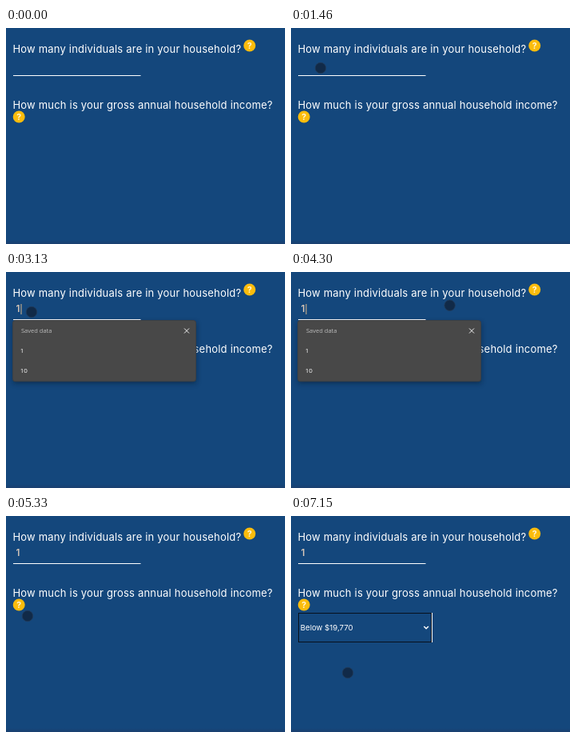
Write an HTML page that moves like this. It is 349x270 px and loops after 8000 ms.

```html
<!DOCTYPE html>
<html lang="en">
<head>
<meta charset="utf-8">
<title>Household form</title>
<style>
  html, body { margin: 0; width: 100%; height: 100%; overflow: hidden; background: #14477c; }
  svg { display: block; width: 100%; height: 100%; }
  text { font-family: Inter, sans-serif; fill: #fff; }
  .ask { font-size: 13px; letter-spacing: .2px; }
  .mark { font-size: 10.5px; font-weight: 700; text-anchor: middle; fill: #fff6d6; }
  .value { font-size: 11.5px; font-weight: 600; fill: #d6c6b8; }
  .option { font-size: 9.6px; }
  .saved text { font-family: "Open Sans", sans-serif; font-size: 8px; }
  .saved .head { font-size: 7.5px; fill: #bcbcbc; }
</style>
</head>
<body>
<svg viewBox="0 0 349 270">
  <defs>
    <filter id="soft" x="-20%" y="-20%" width="140%" height="140%"><feGaussianBlur stdDeviation="3"/></filter>
    <linearGradient id="foot" x2="0" y2="1">
      <stop offset="0" stop-color="#14477c"/>
      <stop offset="1" stop-color="#1a3f6f"/>
    </linearGradient>
    <g id="help">
      <circle r="7.5" fill="#fbbc0c"/>
      <text class="mark" y="3.8">?</text>
    </g>
  </defs>
  <rect width="349" height="270" fill="#14477c"/>
  <rect y="265" width="349" height="5" fill="url(#foot)"/>

  <text class="ask" x="8.4" y="31">How many individuals are in your household?</text>
  <use href="#help" x="304.7" y="22"/>
  <rect x="9" y="59" width="159.5" height="1" fill="#fff"/>
  <text class="value" id="typed" x="12.4" y="50">1</text>
  <rect id="caret" y="40" width="1" height="13" fill="#d9b78c"/>

  <text class="ask" x="8.4" y="101">How much is your gross annual household income?</text>
  <use href="#help" x="16.2" y="111"/>

  <g id="select">
    <rect id="underline" x="9" y="157" width="167" height="1" fill="#fff"/>
    <g id="focus">
      <rect x="176" y="121" width="1" height="37" fill="#fff"/>
      <rect x="9.5" y="121.5" width="166" height="36" fill="none" stroke="#07101c"/>
    </g>
    <text class="option" id="blank" x="11.8" y="143" letter-spacing="-.7">---------</text>
    <text class="option" id="choice" x="11.8" y="143">Below $19,770</text>
    <path d="M166.3 138 l2.8 2.8 2.8 -2.8" fill="none" stroke="#fff" stroke-width="1.5"/>
  </g>

  <g id="list">
    <rect x="9" y="164" width="167" height="93" rx="4" fill="#0a2748" opacity=".5" filter="url(#soft)"/>
    <rect x="9.5" y="161.5" width="166" height="92" rx="4" fill="#14457a" stroke="#50667f"/>
    <path d="M12 161.5H173" stroke="#9fb3c8"/>
  </g>

  <g id="saved" class="saved">
    <rect id="shade" x="9" y="63" width="229" fill="#06172c" opacity=".5" filter="url(#soft)"/>
    <rect id="panel" x="8.5" y="60.5" width="229" rx="3" fill="#484848" stroke="#3b3f44"/>
    <text class="head" x="19" y="76.3">Saved data</text>
    <path d="M223 70.5 l6 6 m0 -6 l-6 6" stroke="#f0f0f0" fill="none"/>
    <g id="rows"></g>
  </g>

  <circle id="cursor" r="6.7" fill="#112a48" stroke="#223c5a" stroke-width=".8"/>
</svg>
<script>
const LOOP = 8000, TICK = 1000 / 15, BLINK = 533, ROW = 24.4;
const APPEAR = 66, FOCUS = 1866, TYPE = 3130, LEAVE = 4430, CHOOSE = 7060;
const $ = id => document.getElementById(id);
const ramp = (t, from, to) => Math.min(1, Math.max(0, (t - from) / (to - from)));
const show = (id, alpha) => $(id).style.opacity = +alpha;

// Each glide starts where the last one ended; via bends it into a curve.
const moves = [];
let spot = [312, 234];
function glide(start, end, to, via = to.map((v, n) => (v + spot[n]) / 2)) {
  moves.push({ start, end, from: spot, via, to });
  spot = to;
}
glide(APPEAR, 867, [55, 53], [196, 14]);
glide(867, 1067, [32, 54]);
glide(1200, 1270, [37, 50]);
glide(1530, 1667, [32, 50]);
glide(3533, 4300, [207, 39], [110, 72]);
glide(4400, 5333, [27, 125], [205, 10]);
glide(5400, 5933, [46, 142]);
glide(6533, 6867, [73, 199], [95, 240]);
glide(7066, 7133, [71, 196]);

function locate(t) {
  const m = moves.findLast(m => m.start <= t) || moves[0];
  const p = ramp(t, m.start, m.end), q = 1 - p;
  return m.from.map((v, n) => q * q * v + 2 * p * q * m.via[n] + p * p * m.to[n]);
}

const rows = ["1", "10", "2", "3", "5"].map((label, i) => {
  const row = document.createElementNS("http://www.w3.org/2000/svg", "text");
  row.setAttribute("x", 17.8);
  row.setAttribute("y", 101.2 + i * ROW);
  row.textContent = label;
  $("rows").append(row);
  return row;
});

function draw(time) {
  const t = Math.floor((time + 7) / TICK) * TICK;
  const typed = t >= TYPE, closed = t >= CHOOSE;

  $("cursor").setAttribute("transform", `translate(${locate(t)})`);
  show("cursor", t >= APPEAR);

  const since = t - (typed ? TYPE : FOCUS);
  show("typed", typed);
  show("caret", since >= 0 && t < LEAVE && Math.floor(since / BLINK) % 2 === 0);
  $("caret").setAttribute("x", typed ? 18.5 : 13);

  const count = typed ? 2 : rows.length;
  for (const id of ["panel", "shade"]) $(id).setAttribute("height", 27.5 + count * ROW);
  rows.forEach((row, i) => row.style.opacity = +(i < count));
  show("saved", ramp(t, 1733, 1933) - ramp(t, 4380, 4533));

  show("select", ramp(t, 5340, 5600));
  show("focus", closed);
  show("underline", !closed);
  show("blank", !closed);
  show("choice", closed);
  show("list", closed ? 0 : ramp(t, 6066, 6200));
}

function frame() {
  draw(performance.now() % LOOP);
  requestAnimationFrame(frame);
}
frame();
</script>
</body>
</html>
```
